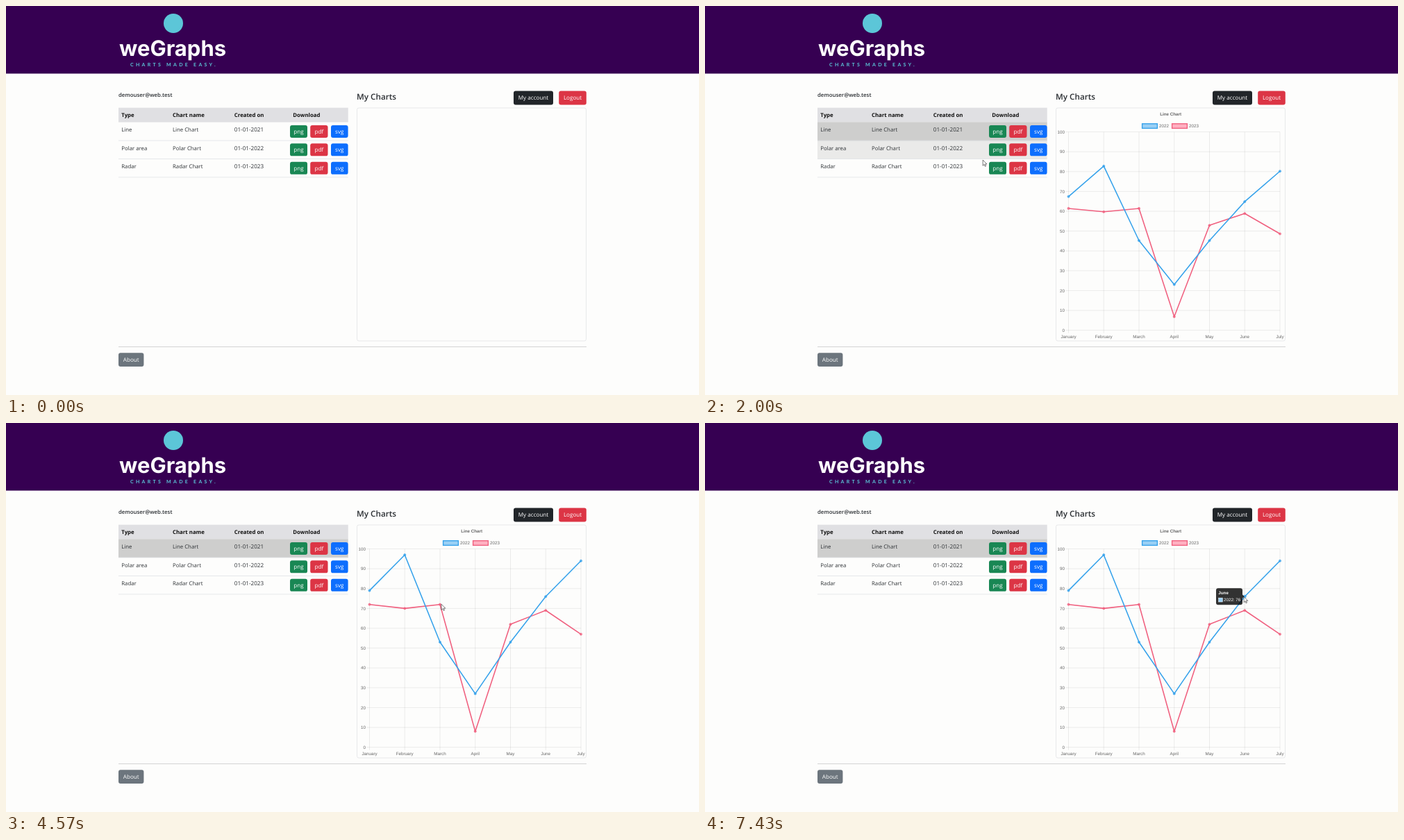
Write an HTML page that moves like this. It is 998 px wide and 561 px high and loops after 8000 ms.

```html
<!DOCTYPE html>
<html lang="en">
<head>
<meta charset="utf-8">
<title>Charts</title>
<style>
  html, body { margin: 0; width: 100%; height: 100%; overflow: hidden; background: #fdfdfc; }
  svg { display: block; width: 998px; height: 561px; }
  text { font-family: "Open Sans", "Noto Sans", sans-serif; font-size: 7.8px; fill: #2b2f33; text-rendering: geometricPrecision; }
  .bold { font-weight: 700; fill: #111; }
  .semi { font-weight: 600; }
  .date { font-size: 8.1px; }
  .head { font-size: 11.7px; font-weight: 600; }
  .btn { font-size: 8.1px; fill: #fff; text-anchor: middle; }
  .brand { font: 700 31px Inter, sans-serif; fill: #fff; }
  .tag { font: 700 7px Lato, sans-serif; letter-spacing: 3.3px; fill: #5cc6d8; }
  #chart text, #tip text { font-family: "Liberation Sans", Arial, sans-serif; font-size: 6.24px; fill: #666; }
  #chart .title { font-weight: 700; }
  #chart .mid { text-anchor: middle; }
  #chart .end { text-anchor: end; }
  #tip text { fill: #fff; }
  #tipTitle { font-weight: 700; }
</style>
</head>
<body>
<svg viewBox="0 0 998 561">
  <rect width="998" height="561" fill="#fdfdfc"/>
  <rect width="998" height="97.5" fill="#360052"/>
  <circle cx="241" cy="25" r="14" fill="#5cc6d8"/>
  <text class="brand" x="163" y="72">weGraphs</text>
  <text class="tag" x="179" y="86.7">CHARTS MADE EASY.</text>
  <text class="semi" x="162" y="130.8">demouser@web.test</text>
  <text class="head" x="505" y="135.2">My Charts</text>
  <g id="table"></g>
  <rect x="505.5" y="147" width="330" height="336" rx="2.6" fill="none" stroke="#dee0e2" stroke-width=".7"/>
  <path d="M162 491.5H836" stroke="#c9cacb" stroke-width=".8"/>
  <g id="buttons"></g>
  <g id="chart"></g>
  <g id="tip">
    <path id="caret" fill="#000" fill-opacity=".8"/>
    <rect width="38" height="24" rx="3" fill="#000" fill-opacity=".8"/>
    <text id="tipTitle" x="3.3" y="8.7"></text>
    <rect id="swatch" x="3.6" y="14" width="5.8" height="5.8" stroke="#fff" stroke-width=".5"/>
    <text id="tipBody" x="11" y="19.2"></text>
  </g>
  <path id="arrow" d="M0 0V8.2L1.9 6.4 3.2 9.3 4.5 8.7 3.2 5.9H5.8Z" fill="#fff" stroke="#222" stroke-width=".6"/>
  <path id="beam" d="M-1.6-4.5H-.4L0-4.1.4-4.5H1.6M0-4.1V4.1M-1.6 4.5H-.4L0 4.1.4 4.5H1.6" fill="none" stroke="#333" stroke-width=".6"/>
</svg>
<script>
const LOOP = 8000;
const $ = id => document.getElementById(id);
const clamp = v => Math.min(1, Math.max(0, v));
const easeOut = p => 1 - (1 - clamp(p)) ** 4;

function add(parent, tag, attrs, text) {
  const el = document.createElementNS('http://www.w3.org/2000/svg', tag);
  for (const k in attrs) el.setAttribute(k, attrs[k]);
  if (text !== undefined) el.textContent = text;
  parent.appendChild(el);
  return el;
}

function button(x, y, width, height, fill, label) {
  const g = $('buttons');
  add(g, 'rect', { x, y, width, height, rx: 2.9, fill });
  add(g, 'text', { x: x + width / 2, y: y + height / 2 + 2.9, class: 'btn' }, label);
}

// Table
const ROW_TOP = 167.6, ROW_H = 26.45;
const columns = [166.3, 240, 328.8, 413.3];
const table = $('table');
add(table, 'rect', { x: 162, y: 146.7, width: 330.7, height: 20.9, fill: '#e0e0e3' });
['Type', 'Chart name', 'Created on', 'Download'].forEach((s, i) =>
  add(table, 'text', { x: columns[i], y: 159.8, class: 'bold' }, s));

const rows = [
  ['Line', 'Line Chart', '01-01-2021'],
  ['Polar area', 'Polar Chart', '01-01-2022'],
  ['Radar', 'Radar Chart', '01-01-2023']
].map((cells, r) => {
  const y = ROW_TOP + r * ROW_H;
  const shade = add(table, 'rect', { x: 162, y, width: 330.7, height: ROW_H, fill: '#000', 'fill-opacity': 0 });
  add(table, 'path', { d: `M162 ${y + ROW_H}H492.7`, stroke: '#dcdfe3', 'stroke-width': .7 });
  cells.forEach((s, i) => add(table, 'text', { x: columns[i], y: y + 13.7, class: i === 2 ? 'date' : '' }, s));
  button(409, y + 4.3, 25, 18, '#198754', 'png');
  button(438.2, y + 4.3, 25.3, 18, '#dc3545', 'pdf');
  button(468, y + 4.3, 24.6, 18, '#0d6efd', 'svg');
  return shade;
});
button(731, 122.6, 57, 19.8, '#212529', 'My account');
button(796.2, 122.6, 39.6, 19.8, '#dc3545', 'Logout');
button(162, 500.2, 36.4, 19.8, '#6c757d', 'About');

// Chart
const months = ['January', 'February', 'March', 'April', 'May', 'June', 'July'];
const px = i => 523.5 + i * 50.75;
const py = v => 467.6 - v * 2.86;
const chart = $('chart');
add(chart, 'text', { x: 670.6, y: 157.9, class: 'title mid' }, 'Line Chart');
for (let v = 0; v <= 100; v += 10) {
  add(chart, 'path', { d: `M519.3 ${py(v)}H828`, stroke: '#000', 'stroke-opacity': .1, 'stroke-width': .7 });
  add(chart, 'text', { x: 518, y: py(v) + 2.2, class: 'end' }, v);
}
months.forEach((m, i) => {
  add(chart, 'path', { d: `M${px(i)} 181.6V471.7`, stroke: '#000', 'stroke-opacity': .1, 'stroke-width': .7 });
  add(chart, 'text', { x: px(i), y: 479, class: 'mid' }, m);
});

const series = [
  { name: '2022', color: '#36a2eb', fill: '#9ad0f5', legend: 629.6, data: [79, 97, 53, 27, 53, 76, 94] },
  { name: '2023', color: '#f0607f', fill: '#ffb1c1', legend: 672.6, data: [72, 70, 72, 8, 62, 69, 57] }
];
for (const s of series) {
  add(chart, 'rect', { x: s.legend, y: 169.8, width: 21.8, height: 6.6, fill: s.fill, stroke: s.color, 'stroke-width': 1.4 });
  add(chart, 'text', { x: s.legend + 24.5, y: 175.2 }, s.name);
}
for (const s of [...series].reverse()) {
  s.line = add(chart, 'path', { fill: 'none', stroke: s.color, 'stroke-width': 1.56, 'stroke-linejoin': 'round' });
  s.dots = s.data.map((_, i) => add(chart, 'circle', {
    cx: px(i), fill: s.color, 'fill-opacity': .75, stroke: s.color, 'stroke-width': .6 }));
}

const CLICK = 1620;
// Tooltips: time shown and hidden, series, month, corner
const tips = [
  { on: 2700, off: 3930, set: 0, i: 1, x: 577.6, y: 178 },
  { on: 4690, off: 6160, set: 1, i: 2, x: 628.4, y: 249.7 },
  { on: 6980, off: 9000, set: 0, i: 5, x: 736, y: 238.2, flip: true }
];

// Pointer path: time, x, y
const path = [
  [500, 36, 281], [1000, 190, 205], [1250, 249.3, 181.3], [1650, 249.3, 181.3],
  [2000, 399.7, 222], [2200, 500, 224], [2680, 575.7, 189.3], [3870, 575.7, 189.3],
  [4500, 627, 261.3], [4640, 627, 261.3], [4700, 628.6, 262], [6100, 628.6, 262],
  [6500, 700, 273], [6930, 776, 250.5], [8000, 776, 250.5]
];

function slope(i, c) {
  const a = path[i - 1] || path[i], b = path[i + 1] || path[i], p = path[i];
  const rest = (path[i - 1] && a[1] === p[1]) || (path[i + 1] && b[1] === p[1]);
  return rest ? 0 : (b[c] - a[c]) / (b[0] - a[0]);
}

function pointer(t) {
  let i = 0;
  while (i < path.length - 2 && t > path[i + 1][0]) i++;
  const a = path[i], b = path[i + 1], d = b[0] - a[0], u = clamp((t - a[0]) / d);
  return [1, 2].map(c =>
    a[c] * (1 + 2 * u) * (1 - u) ** 2 + b[c] * u * u * (3 - 2 * u) +
    d * u * (1 - u) * (slope(i, c) * (1 - u) - slope(i + 1, c) * u));
}

function drawRows(t) {
  const [x, y] = pointer(t - 30);
  const over = t > 500 && x > 162 && x < 493 ? Math.floor((y - ROW_TOP) / ROW_H) : -1;
  rows.forEach((r, i) => r.setAttribute('fill-opacity', i === 0 && t >= CLICK ? .19 : i === over ? .075 : 0));
}

function drawChart(t) {
  chart.style.display = t < CLICK ? 'none' : '';
  const k = easeOut((t - CLICK) / 1000);
  series.forEach((s, n) => {
    const ys = s.data.map(v => py(v * k));
    s.line.setAttribute('d', 'M' + ys.map((y, i) => px(i) + ' ' + y).join('L'));
    s.dots.forEach((dot, i) => {
      const hot = tips.some(p => p.set === n && p.i === i && t >= p.on && t < p.off);
      dot.setAttribute('cy', ys[i]);
      dot.setAttribute('r', hot ? 2.1 : 1.6);
    });
  });
}

function drawTip(t) {
  const n = tips.findLastIndex(p => t >= p.on);
  const tip = $('tip');
  tip.style.display = n < 0 ? 'none' : '';
  if (n < 0) return;
  const p = tips[n], from = tips[n - 1] || p, s = series[p.set];
  const k = easeOut((t - p.on) / 400);
  tip.setAttribute('transform', `translate(${from.x + (p.x - from.x) * k} ${from.y + (p.y - from.y) * k})`);
  tip.setAttribute('opacity', clamp((t - p.on) / 200) * (1 - clamp((t - p.off) / 200)));
  $('caret').setAttribute('d', p.flip ? 'M38 9.4L40.6 12 38 14.6Z' : 'M0 9.4L-2.6 12 0 14.6Z');
  $('tipTitle').textContent = months[p.i];
  $('tipBody').textContent = `${s.name}: ${s.data[p.i]}`;
  $('swatch').setAttribute('fill', s.fill);
}

function drawPointer(t) {
  const [x, y] = pointer(t);
  const text = t > 1180 && t < 1720;
  $('arrow').style.display = t < 500 || text ? 'none' : '';
  $('beam').style.display = text ? '' : 'none';
  for (const id of ['arrow', 'beam']) $(id).setAttribute('transform', `translate(${x} ${y})`);
}

const start = performance.now();
function frame() {
  const t = (performance.now() - start) % LOOP;
  drawRows(t);
  drawChart(t);
  drawTip(t);
  drawPointer(t);
  requestAnimationFrame(frame);
}
frame();
</script>
</body>
</html>
```
